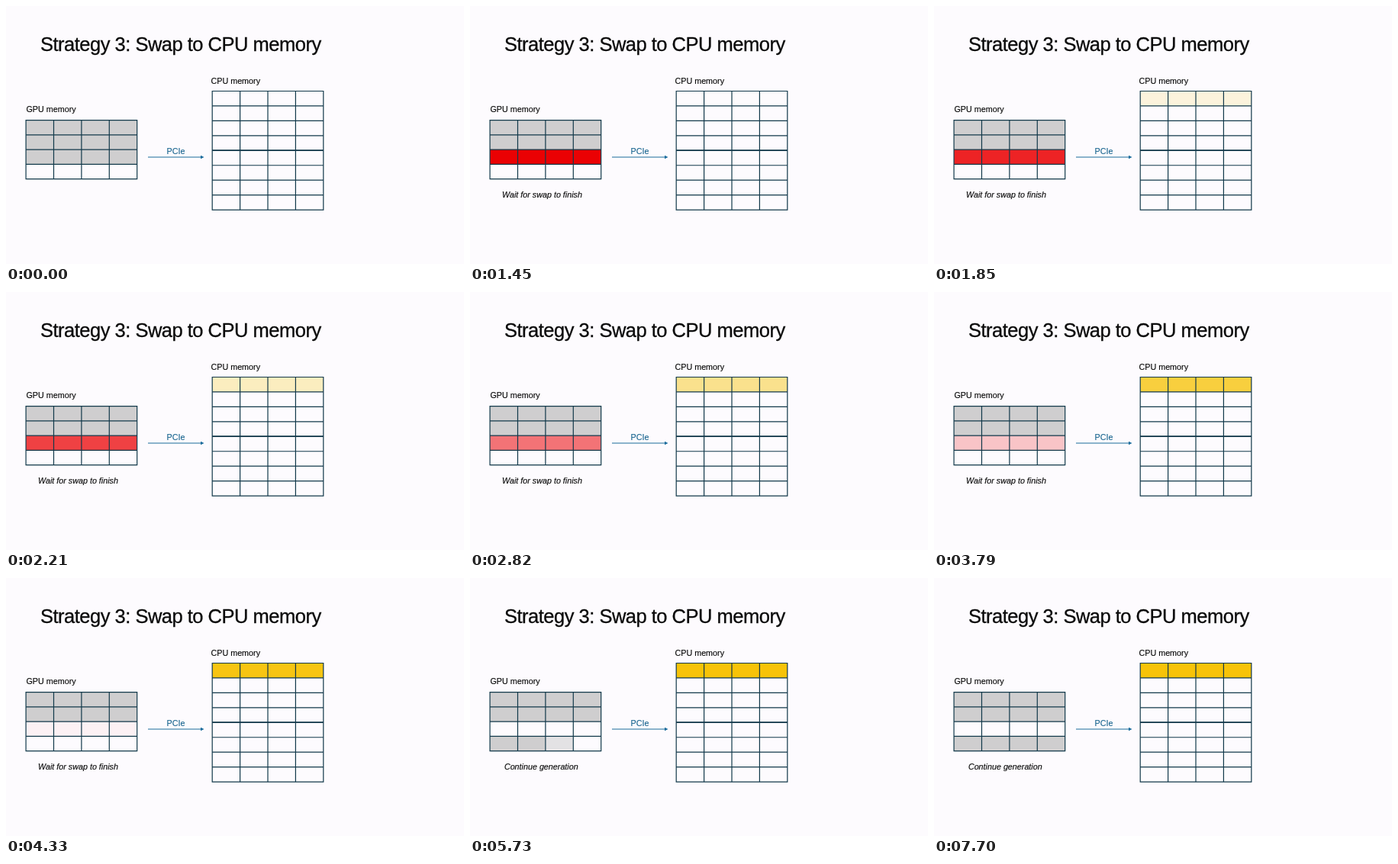
Recreate the animation shown at these times as an HTML page. Size 600 by 338 pixels, loop 7730 ms.

```html
<!DOCTYPE html>
<html lang="en">
<head>
<meta charset="utf-8">
<title>Swap to CPU memory</title>
<style>
  html, body { margin: 0; width: 100%; height: 100%; overflow: hidden; background: #fdfbfe; }
  svg { display: block; width: 100%; height: 100%; }
  text { font: 10.75px "Liberation Sans", Arial, sans-serif; fill: #0a0a0a; stroke: #0a0a0a; stroke-width: .15; }
  .title { font-size: 25.5px; letter-spacing: -.5px; stroke-width: .3; }
  .note { font-style: italic; text-anchor: middle; }
  .link { fill: #1a6690; stroke: #1a6690; }
  .grid { fill: none; stroke: #12394a; stroke-width: 1.2; }
</style>
</head>
<body>
<svg id="stage" viewBox="0 0 600 338">
  <rect width="600" height="338" fill="#fdfbfe"/>
  <text class="title" x="45" y="58.5">Strategy 3: Swap to CPU memory</text>
  <text x="26.5" y="139">GPU memory</text>
  <text x="268.5" y="102">CPU memory</text>
  <g id="cells"></g>
  <g id="lines"></g>
  <path class="grid" d="M270 189H416" stroke-width="1.7" style="stroke-width:1.7"/>
  <text class="link" x="210.5" y="194">PCIe</text>
  <path d="M186 198H256" stroke="#1b6c9c" stroke-width="1.2"/>
  <path d="M255 195.8L259.5 198L255 200.2Z" fill="#1b6c9c"/>
  <text class="note" id="wait" x="94.5" y="251">Wait for swap to finish</text>
  <text class="note" id="resume" x="93.3" y="251">Continue generation</text>
</svg>
<script>
const NS = "http://www.w3.org/2000/svg";
const LOOP = 7730, COLS = 4, CELL_W = 36.4;
const PAPER = [253, 251, 254], GRAY = [207, 206, 207], RED = [234, 0, 2], GOLD = [247, 195, 8];

// Swap starts, swap ends, then one new cell per CELL_TIME
const MARK_START = 450, MARK_END = 900, SWAP_START = 1435, SWAP_END = 4450, CELL_TIME = 500;

const gpu = { x: 26.1, y: 149.6, rows: 4, rowH: 19.25 };
const cpu = { x: 270.2, y: 111.5, rows: 8, rowH: 19.45 };
const byId = id => document.getElementById(id);

function add(parent, tag, attrs) {
  const el = document.createElementNS(NS, tag);
  for (const key in attrs) el.setAttribute(key, attrs[key]);
  return byId(parent).appendChild(el);
}

function drawGrid({ x, y, rows, rowH }) {
  const w = COLS * CELL_W, h = rows * rowH;
  let d = "";
  for (let r = 0; r <= rows; r++) d += `M${x - .6} ${y + r * rowH}h${w + 1.2}`;
  for (let c = 0; c <= COLS; c++) d += `M${x + c * CELL_W} ${y}v${h}`;
  add("lines", "path", { class: "grid", d });
}

function block(grid, row, col = 0, span = COLS) {
  return add("cells", "rect", {
    x: grid.x + col * CELL_W, y: grid.y + row * grid.rowH,
    width: span * CELL_W, height: grid.rowH
  });
}

const mix = (a, b, p) => a.map((v, i) => v + (b[i] - v) * p);
const progress = (t, from, to) => Math.min(1, Math.max(0, (t - from) / (to - from)));
const paint = (el, color) => el.setAttribute("fill", `rgb(${color.map(Math.round)})`);
const show = (el, on) => el.setAttribute("visibility", on ? "visible" : "hidden");

paint(block(gpu, 0), GRAY);
paint(block(gpu, 1), GRAY);
const victim = block(gpu, 2);
const fresh = Array.from({ length: COLS }, (_, c) => block(gpu, 3, c, 1));
const swapped = block(cpu, 0);
drawGrid(gpu);
drawGrid(cpu);

function render(t) {
  const swap = progress(t, SWAP_START, SWAP_END);
  const marked = mix(GRAY, RED, progress(t, MARK_START, MARK_END));
  paint(victim, mix(marked, PAPER, swap));
  paint(swapped, mix(PAPER, GOLD, swap));
  fresh.forEach((cell, i) => {
    const start = SWAP_END + i * CELL_TIME;
    paint(cell, mix(PAPER, GRAY, progress(t, start, start + CELL_TIME)));
  });
  show(byId("wait"), t >= SWAP_START && t < SWAP_END);
  show(byId("resume"), t >= SWAP_END);
}

const begin = performance.now();
function tick() {
  render((performance.now() - begin) % LOOP);
  requestAnimationFrame(tick);
}
tick();
</script>
</body>
</html>
```
